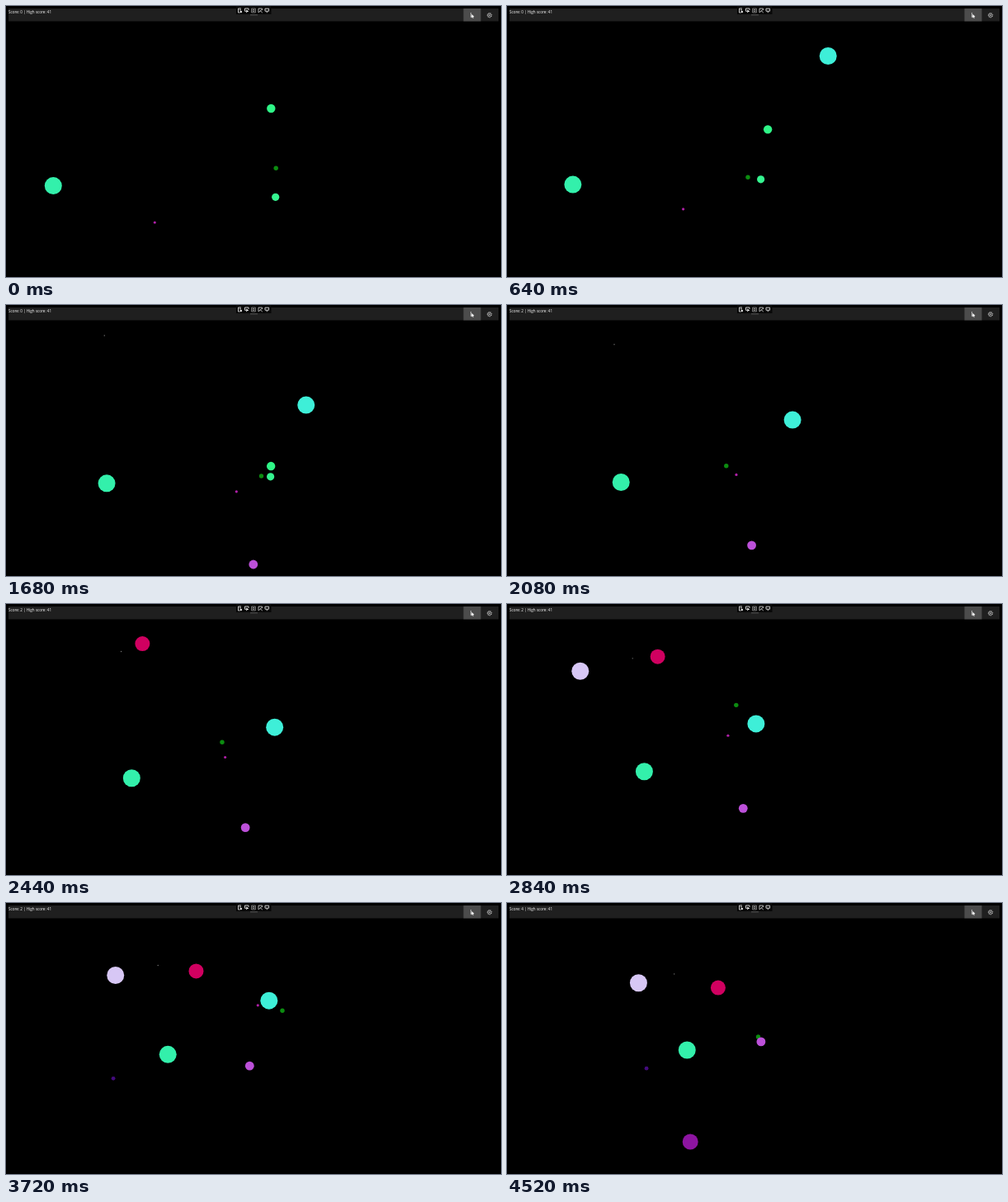
Recreate the animation shown at these times as an HTML page with a canvas. Size 600 by 328 pixels, loop 5 s.

```html
<!DOCTYPE html>
<html lang="en">
<head>
<meta charset="utf-8">
<title>Dot chase</title>
<style>
  html, body { margin: 0; width: 100%; height: 100%; overflow: hidden; background: #000; }
  canvas { display: block; }
</style>
</head>
<body>
<canvas id="stage" width="600" height="328"></canvas>
<script>
const LOOP = 5000, STEP = 40, GAME_OVER = 4280;
const FIRST_SPAWN = 620, SPAWN_EVERY = 525;
const ctx = document.getElementById('stage').getContext('2d');

const PLAYER = { color: '#0c8c10', r: 2.7 };
// Bends of the player's route: time, x, y
const ROUTE = [
  [0, 327.2, 196.2], [640, 292, 207.2], [920, 318, 225], [1200, 342, 219], [1440, 331, 207], [1680, 309.5, 207],
  [2040, 268, 197], [2440, 262, 167.3], [2820, 277, 124], [3200, 293.5, 103], [3460, 322, 112],
  [3720, 335, 130.2], [4000, 322, 155], [4280, 304.5, 162]
];

const chaser = (color, r, x, y, speed) => ({ color, r, x, y, speed });
const opening = [
  chaser('#33f0ab', 10.5, 57.3, 217.6, .0406),
  chaser('#2ff687', 5.2, 321.3, 124, .047),
  chaser('#35f590', 4.6, 326.7, 231.3, .0568),
  chaser('#b01fa8', 1.6, 180.3, 262, .0665)
];
const spawns = [
  chaser('#3eefd8', 10.5, 389.2, 60.5, .0635),
  chaser('#777', .7, 104, 24.5, .038),
  chaser('#bc50d9', 5.4, 299.8, 314, .059),
  chaser('#d00060', 9, 157, 36.8, .0585),
  chaser('#d7c7f5', 10.5, 82.9, 79.8, .0505),
  chaser('#430b7c', 2.4, 101.4, 226.7, .073),
  chaser('#8d14a1', 9.5, 211, 304.6, .04)
];

// Hermite curve through the route, slopes taken from neighbouring bends.
function playerAt(t) {
  const last = ROUTE.length - 1;
  let i = 0;
  while (i < last - 1 && t >= ROUTE[i + 1][0]) i++;
  const a = ROUTE[i], b = ROUTE[i + 1], span = b[0] - a[0], u = (t - a[0]) / span;
  const slope = (k, axis) => {
    const p = ROUTE[Math.max(0, k - 1)], n = ROUTE[Math.min(last, k + 1)];
    return (n[axis] - p[axis]) / (n[0] - p[0]) * span;
  };
  const [x, y] = [1, 2].map(axis => {
    const d = b[axis] - a[axis], m = slope(i, axis), n = slope(i + 1, axis);
    return a[axis] + u * (m + u * (3 * d - 2 * m - n + u * (m + n - 2 * d)));
  });
  return { ...PLAYER, x, y };
}

const distance = (a, b) => Math.hypot(a.x - b.x, a.y - b.y);
const collide = (a, b) => a !== b && distance(a, b) < .9 * (a.r + b.r);

function chase(ball, player, length) {
  const k = Math.min(1, length / distance(ball, player));
  return { ...ball, x: ball.x + (player.x - ball.x) * k, y: ball.y + (player.y - ball.y) * k };
}

// Play the round once: chasers home in on the player, colliding ones score and vanish.
function playRound() {
  const frames = [];
  let balls = opening, score = 0, spawned = 0;
  for (let t = 0; t <= GAME_OVER; t += STEP) {
    const player = playerAt(t);
    if (t > 0) {
      const target = playerAt(t - STEP / 2);
      const pace = t <= 640 ? .87 : 1;   // slow start
      balls = balls.map(ball => chase(ball, target, ball.speed * pace * STEP));
    }
    const alive = balls.filter(a => !balls.some(b => collide(a, b)));
    score += balls.length - alive.length;
    balls = alive;
    if (spawned < spawns.length && t >= FIRST_SPAWN + spawned * SPAWN_EVERY) {
      balls = [...balls, spawns[spawned++]];
    }
    frames.push({ score, balls: [player, ...balls] });
  }
  return frames;
}

function rect(color, x, y, w, h) {
  ctx.fillStyle = color;
  ctx.fillRect(x, y, w, h);
}

function circle({ color, x, y, r }) {
  ctx.fillStyle = color;
  ctx.beginPath();
  ctx.arc(x, y, r, 0, 2 * Math.PI);
  ctx.fill();
}

function stroke(d, color, width) {
  ctx.strokeStyle = color;
  ctx.lineWidth = width;
  ctx.stroke(new Path2D(d));
}

function fill(d, color) {
  ctx.fillStyle = color;
  ctx.fill(new Path2D(d));
}

function drawHeader(score) {
  rect('#1f1f1f', 3, 3, 594, 15.5);
  rect('#4c4c4c', 554.5, 3, 21, 15.5);
  ctx.fillStyle = '#fff';
  ctx.font = '4.6px "Open Sans", sans-serif';
  ctx.fillText(`Score: ${score} | High score: 41`, 3, 8.5);

  // Debug toolbar
  rect('#080808', 279, 0, 42.5, 10);
  rect('#555', 296, 10.3, 9, 1);
  stroke('M281.5 3h3.5M281.5 3v5h2M282.7 4.8h2.3', '#ddd', .9);
  circle({ color: '#ddd', x: 284.8, y: 7, r: 1.3 });
  stroke('M291 6.3h-1.5v-3.3h4.5v2', '#ddd', .9);
  fill('M291.3 4.3l3 2.6-1.8.2-1.2 1.5z', '#fff');
  stroke('M297.6 3.1h4.8v4.8h-4.8zM299 4.5h2v2h-2z', '#aaa', .7);
  stroke('M306 7.8v-4.7h4.5v2M306.2 7.8l3.6-3.2M308 5.5l2.8 2.6', '#ddd', .8);
  stroke('M314 3.2h4.6v3h-4.6zM316.3 6.2v2', '#ddd', .9);

  // Pointer and settings
  stroke('M563.5 8v5.5l1.3-1.1', '#ccc', .8);
  fill('M564.4 9.8l3.2 3.3-1.5.2.6 1.3-.8.4-.6-1.4-.9.8z', '#fff');
  ctx.setLineDash([1.1, 1]);
  stroke('M583.4 11.2a2.7 2.7 0 1 0 5.4 0a2.7 2.7 0 1 0-5.4 0', '#bbb', 1);
  ctx.setLineDash([]);
  stroke('M584 11.2a2.1 2.1 0 1 0 4.2 0a2.1 2.1 0 1 0-4.2 0', '#bbb', .7);
  circle({ color: '#aaa', x: 586.1, y: 11.2, r: .9 });
}

const frames = playRound();
const start = performance.now();

function tick() {
  const t = Math.min(GAME_OVER, (performance.now() - start) % LOOP);
  const { score, balls } = frames[Math.floor(t / STEP)];
  rect('#000', 0, 0, 600, 328);
  drawHeader(score);
  balls.forEach(circle);
  requestAnimationFrame(tick);
}
tick();
</script>
</body>
</html>
```
